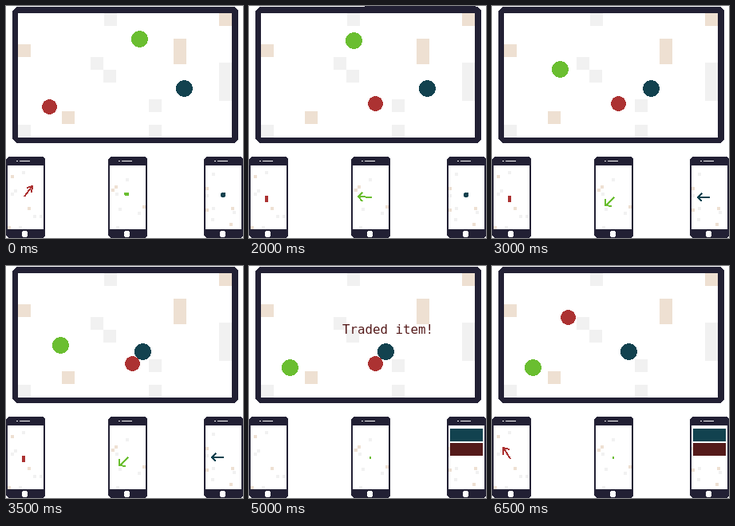
These frames come from a looping animation (297x291 px, 7000 ms). An HTML page:

```html
<!DOCTYPE html>
<html lang="en">
<head>
<meta charset="utf-8">
<title>Shared screen and three phones</title>
<style>
  html, body { margin: 0; width: 100%; height: 100%; overflow: hidden; background: #fff; }
  svg { display: block; width: 100%; height: 100%; shape-rendering: crispEdges; }
  .dark { fill: #222034; }
  .light { fill: #f1f1f1; }
  .beige { fill: #eee0d2; }
  .red { fill: #ac3232; color: #ac3232; }
  .green { fill: #6abe30; color: #6abe30; }
  .teal { fill: #12424f; color: #12424f; }
  .maroon { fill: #541a1a; }
  .arrow { fill: none; stroke: currentColor; stroke-width: 2; }
  text { font: 15.8px "DejaVu Sans Mono", "Liberation Mono", monospace; white-space: pre; }
</style>
</head>
<body>
<svg viewBox="0 0 297 291" preserveAspectRatio="none">
  <defs>
    <g id="phone">
      <path class="dark" d="M3 189H46L49 192V288L46 291H3L0 288V192Z"/>
      <path fill="#fff" d="M2 200H47V280H2ZM17 194H30V195H17ZM13 194H15V195H13Z"/>
      <circle cx="23.5" cy="286" r="4" fill="#fff"/>
    </g>
  </defs>

  <!-- Shared screen -->
  <path class="dark" d="M13 1H286L291 6V167L286 172H13L8 167V6Z"/>
  <path class="dark" d="M145 0H284V2H145Z" data-show="2000 2500"/>
  <path fill="#fff" d="M15 9H283V165H15Z"/>
  <path class="light" d="M123 9h16v16h-16zM106 64h16v16h-16zM122 80h16v16h-16zM267 71h16v48h-16zM179 117h16v16h-16zM15 149h16v16h-16zM179 149h16v16h-16z"/>
  <path class="beige" d="M267 9h16v16h-16zM15 48h16v16h-16zM210 41h16v32h-16zM70 132h16v16h-16z"/>
  <circle class="red" r="9.5" data-ball="red"/>
  <circle class="green" r="10.5" data-ball="green"/>
  <circle class="teal" r="10.5" data-ball="teal"/>
  <text class="maroon" x="117" y="85" data-show="5000 5500">Traded item!</text>
  <text class="maroon" x="117" y="62" data-show="5500 6000">Traded item!</text>

  <!-- Phones -->
  <use href="#phone"/>
  <use href="#phone" x="128"/>
  <use href="#phone" x="248"/>
  <path class="light" d="M20 207h4v4h-4zM10 230h4v4h-4zM6 234h4v4h-4zM34 262h4v4h-4zM42 262h4v4h-4zM16 276h4v4h-4z
    M150 216h4v4h-4zM137 234h4v4h-4zM141 253h4v4h-4zM165 258h4v4h-4zM138 276h4v4h-4z
    M258 209h4v4h-4zM250 236h4v4h-4zM258 252h4v4h-4zM284 257h4v4h-4zM257 266h4v4h-4z"/>
  <path class="beige" d="M6 212h4v4h-4zM27 252h4v4h-4zM2 276h4v4h-4z
    M136 225h4v4h-4zM132 229h4v4h-4zM171 250h4v4h-4z
    M250 227h4v4h-4zM282 252h4v4h-4zM250 254h4v4h-4zM280 272h4v4h-4z"/>

  <g class="red">
    <path class="arrow" d="M23 239L32 227M26 228L33 226L32 234" data-show="0 1000"/>
    <path class="arrow" d="M23 238H28L39 236M34 232L39 236L35 241" data-show="1000 1500"/>
    <path class="arrow" d="M24 238L37 246M37 238L38 247L29 247" data-show="1500 2000"/>
    <path d="M20 238h4v8h-4z" data-show="2000 4000"/>
    <path d="M4 204h41v16H4z" data-show="4000 4500"/>
    <path class="maroon" d="M4 204h41v16H4z" data-show="4500 5000"/>
    <path class="arrow" d="M23 242L15 229M14 237V228L22 230" data-show="6000 7000"/>
  </g>
  <g class="green">
    <path d="M148 234h6v4h-5v-1h-1z" data-show="0 2000"/>
    <path class="arrow" d="M154 240L137 239M142 234L137 239L142 245" data-show="2000 2500"/>
    <path class="arrow" d="M154 240L140 247M142 239L139 247L147 250" data-show="2500 3000"/>
    <path class="arrow" d="M153 240L143 250M142 242V250L150 251" data-show="3000 4000"/>
    <path d="M151 239h2v3h-2z" data-show="4000 7000"/>
  </g>
  <g class="teal">
    <path d="M270 234h5v5h-1v1h-4v-1h-1v-4h1z" data-show="0 3000"/>
    <path class="arrow" d="M273 240H258M263 235L258 240L263 245" data-show="3000 4000"/>
    <path d="M252 204h41v16h-41z" data-show="4000 7000"/>
    <path class="maroon" d="M252 222h41v16h-41z" data-show="5000 7000"/>
  </g>
</svg>
<script>
  const LOOP = 7000, STEP = 500;

  // Each stop is [time, x, y]; balls jump from stop to stop.
  const stops = {
    red: [[0, 54.5, 126.5], [500, 84.5, 106.5], [1000, 118.5, 106.5], [1500, 158.5, 122.5],
          [6000, 129.5, 96.5], [6500, 95.5, 64.5]],
    green: [[0, 167.5, 41.5], [2000, 131.5, 43.5], [2500, 96.5, 60.5], [3000, 85.5, 79.5],
            [3500, 68.5, 99.5], [4000, 51.5, 127.5]],
    teal: [[0, 223.5, 103.5], [3000, 199.5, 103.5], [3500, 171.5, 107.5]]
  };
  const balls = document.querySelectorAll("[data-ball]");
  const timed = [...document.querySelectorAll("[data-show]")].map(el => {
    const [from, to] = el.dataset.show.split(" ").map(Number);
    return { el, from, to };
  });

  let shown = -1;
  function draw(time) {
    if (time === shown) return;
    shown = time;
    for (const ball of balls) {
      const [, x, y] = stops[ball.dataset.ball].findLast(stop => stop[0] <= time);
      ball.setAttribute("cx", x);
      ball.setAttribute("cy", y);
    }
    for (const { el, from, to } of timed) {
      el.style.display = time >= from && time < to ? "" : "none";
    }
  }

  function tick() {
    const time = performance.now() % LOOP;
    draw(Math.floor(time / STEP) * STEP);
    requestAnimationFrame(tick);
  }
  draw(0);
  requestAnimationFrame(tick);
</script>
</body>
</html>
```
